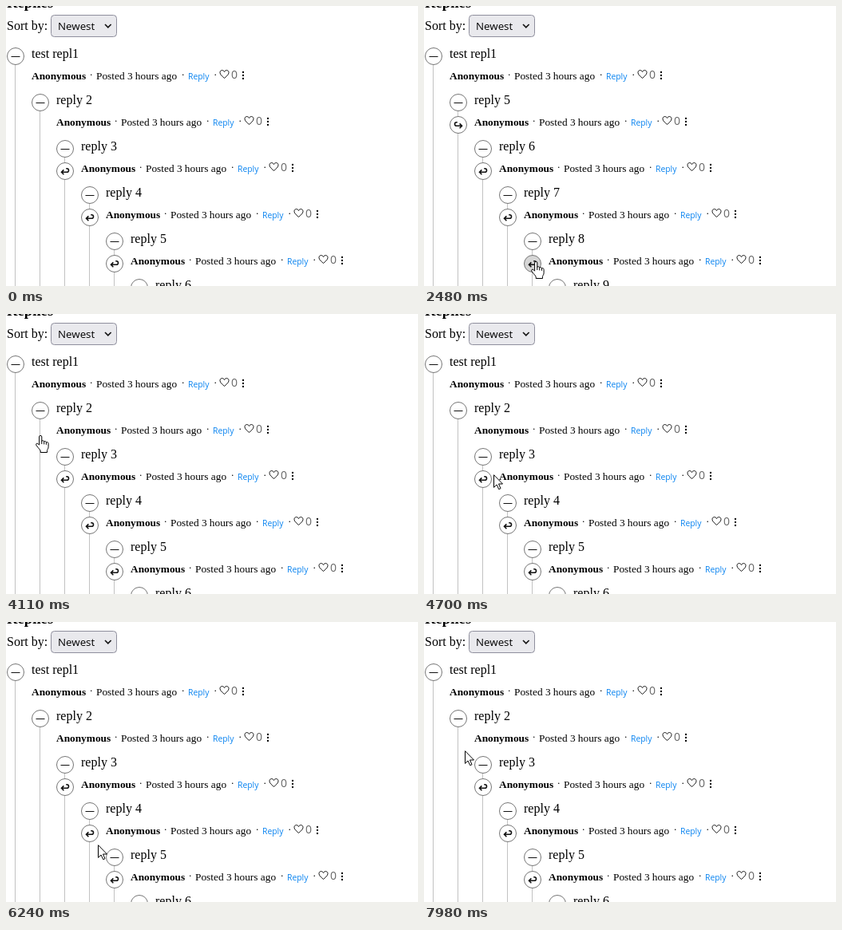
An HTML page for the animation above (8000 ms loop, 516x351 px).

```html
<!DOCTYPE html>
<html lang="en">
<head>
<meta charset="utf-8">
<title>Nested replies</title>
<style>
  html, body { margin: 0; width: 100%; height: 100%; overflow: hidden; background: #fff; }
  svg { display: block; width: 516px; height: 351px; }
  text { font: 16px "Liberation Serif", "Times New Roman", serif; fill: #000; white-space: pre; }
  .heading { font-size: 18.72px; font-weight: bold; }
  .meta { font-size: 13.333px; }
  .bold { font-weight: bold; }
  .choice, .link, .count { font-family: "Open Sans", sans-serif; }
  .choice { font-size: 13.333px; }
  .link { font-size: 10.4px; fill: #0a84f0; }
  .count { font-size: 14px; fill: #666; }
  .select { fill: #e9e9ed; stroke: #8f8f9d; }
  .thread { stroke: #c2c2c2; }
  .button circle { fill: #fff; stroke: #767676; }
  .button.over circle { fill: #d6d6d6; }
  .icon { fill: none; stroke: #111; }
  .arrow { stroke-width: 1.6; }
  .pointer { fill: #fff; stroke: #000; stroke-linejoin: round; }
</style>
</head>
<body>
<svg viewBox="0 0 516 351">
  <text class="heading" x="1" y="2">Replies</text>
  <text x="1" y="30">Sort by:</text>
  <rect class="select" x="56.5" y="11.5" width="82" height="27" rx="4"/>
  <text class="choice" x="65" y="30">Newest</text>
  <path class="icon arrow" d="M124 23l3.8 3.8 3.8-3.8"/>
  <g id="lines"></g>
  <g id="replies"></g>
  <g id="cursor">
    <path id="tip" class="pointer" d="M.5 .7V16.4L4.1 13 6.7 18.7 9 17.7 6.5 12H11.5Z"/>
    <g id="hand" class="pointer" transform="translate(-7 1)">
      <path d="M4.6 2a1.6 1.6 0 0 1 3.2 0V7.2c.9-.9 2.6-.5 2.9.6 .9-.6 2.5-.2 2.7.9 1.1-.4 2.7.1 2.7 1.6v4.4c0 2.3-1.6 3.2-1.6 4.6v2.2H6.2v-2C4.9 16.9 2 14.6.8 12.2c-.6-1.6 1-2.7 2.3-1.6l1.5 1.6Z"/>
      <path d="M7.8 7v4M10.7 8v3.4M13.4 9v2.8"/>
    </g>
  </g>
</svg>
<script>
const LOOP = 8000, STEP_X = 31, STEP_Y = 58, LEVELS = 6, FIRST = 2;
const HIT_RADIUS = 13, CURSOR_LAG = 130;

const linear = k => k;
const easeIn = k => k * k;
const easeOut = k => k * (2 - k);
const smooth = k => k * k * (3 - 2 * k);

const $ = id => document.getElementById(id);

function add(parent, tag, attrs, content) {
  const el = document.createElementNS("http://www.w3.org/2000/svg", tag);
  for (const key in attrs) el.setAttribute(key, attrs[key]);
  if (content) el.textContent = content;
  return parent.appendChild(el);
}

// Centre of a level's fold button, or of the jump button below it.
const foldAt = level => ({ x: 12 + STEP_X * level, y: 63 + STEP_Y * level });
const jumpAt = level => ({ x: foldAt(level).x, y: foldAt(level).y + 28 });
const near = (p, dx, dy) => ({ x: p.x + dx, y: p.y + dy });

const titles = [], buttons = [];

function addButton(level, isJump) {
  const { x, y } = isJump ? jumpAt(level) : foldAt(level);
  const el = add($("replies"), "g", { class: "button", transform: `translate(${x} ${y})` });
  add(el, "circle", { r: 10.5 });
  if (isJump) {
    add(el, "path", {
      class: "icon arrow",
      d: "M-4.5 1.3H2.2A2.3 2.3 0 0 0 2.2-3.3H1.2M-1.6-1.6L-4.5 1.3-1.6 4.2",
      transform: level === 1 ? "scale(-1 1)" : ""
    });
  } else {
    add(el, "path", { class: "icon", d: "M-5.5 .5H5.5" });
  }
  buttons.push({ el, x, y, level, isBack: isJump && level === 1 });
}

function addReply(level) {
  const dx = STEP_X * level, dy = STEP_Y * level;
  add($("lines"), "path", { class: "thread", d: `M${dx + 11.5} ${dy + 63}V351` });
  const row = add($("replies"), "g", { transform: `translate(${dx} ${dy})` });
  const label = (cls, x, y, content) => add(row, "text", { class: cls, x, y }, content);
  titles.push(label("", 32, 65, "test repl1"));
  label("meta bold", 32, 92, "Anonymous");
  label("meta", 113, 92, "Posted 3 hours ago");
  label("link", 228, 92, "Reply");
  label("count", 282, 91, "0");
  for (const x of [104.5, 219.5, 260]) label("meta", x, 90, "·");
  add(row, "path", {
    class: "icon",
    d: "M273.5 90.5C271 88 268 86.4 268 83.4 268 80 272.4 79.6 273.5 82.6 274.6 79.6 279 80 279 83.4 279 86.4 276 88 273.5 90.5Z"
  });
  for (let i = 0; i < 3; i++) add(row, "circle", { cx: 297, cy: 83 + 4 * i, r: 1.15 });
  addButton(level, false);
  if (level) addButton(level, true);
}

for (let level = 0; level < LEVELS; level++) addReply(level);

// Pointer travel; it rests where it arrived until the next move.
const move = (start, end, to, easeX = smooth, easeY = easeX) => ({ start, end, to, easeX, easeY });
const entry = { x: 506, y: 226 };
const moves = [
  move(990, 1740, { x: 163, y: 277 }, easeOut, easeIn),
  move(1740, 2080, near(jumpAt(4), 5, -4), easeOut),
  move(2540, 3250, near(jumpAt(1), 15, 8), easeOut),
  move(3250, 3450, near(jumpAt(1), 1, 2)),
  move(4370, 5230, near(jumpAt(4), 20, -21), linear, smooth),
  move(5350, 5690, near(jumpAt(4), 5, -3)),
  move(5900, 6430, near(jumpAt(3), 0, -3)),
  move(6630, 7170, near(jumpAt(1), 9, 7), easeOut),
  move(7240, 7380, near(jumpAt(1), 4, 4)),
  move(7950, 7980, near(jumpAt(1), 8, 12))
];

function pointerAt(t) {
  if (t < moves[0].start) return null;
  let p = entry;
  for (const m of moves) {
    if (t < m.start) break;
    const k = Math.min(1, (t - m.start) / (m.end - m.start));
    p = near(p, (m.to.x - p.x) * m.easeX(k), (m.to.y - p.y) * m.easeY(k));
  }
  return p;
}

const isShown = (button, first) => !button.isBack || first > FIRST;

function buttonUnder(p, first) {
  return p && buttons.find(b =>
    isShown(b, first) && Math.hypot(p.x - b.x, p.y - b.y) < HIT_RADIUS);
}

// A click moves the pressed reply to the second level, or goes back.
const views = [{ start: -LOOP, first: FIRST }];
for (const start of [2480, 4110, 6500, 7650]) {
  const { first } = views.at(-1);
  const { level, isBack } = buttonUnder(pointerAt(start), first);
  views.push({ start, first: isBack ? FIRST : first + level - 1 });
}

const viewAt = t => views.findLast(v => t >= v.start).first;

let shownView;

function showView(first) {
  shownView = first;
  titles.slice(1).forEach((el, i) => el.textContent = "reply " + (first + i));
  for (const b of buttons) b.el.style.display = isShown(b, first) ? "" : "none";
}

function draw(t) {
  const first = viewAt(t), p = pointerAt(t);
  if (first !== shownView) showView(first);
  const over = buttonUnder(p, first);
  for (const b of buttons) b.el.classList.toggle("over", b === over);

  // The pointer shape follows a removed button a moment late.
  const isHand = over || buttonUnder(p, viewAt(t - CURSOR_LAG));
  $("cursor").style.display = p ? "" : "none";
  $("hand").style.display = isHand ? "" : "none";
  $("tip").style.display = isHand ? "none" : "";
  if (p) $("cursor").setAttribute("transform", `translate(${Math.round(p.x)} ${Math.round(p.y)})`);
}

const began = performance.now();
function tick() {
  draw((performance.now() - began) % LOOP);
  requestAnimationFrame(tick);
}
tick();
</script>
</body>
</html>
```
